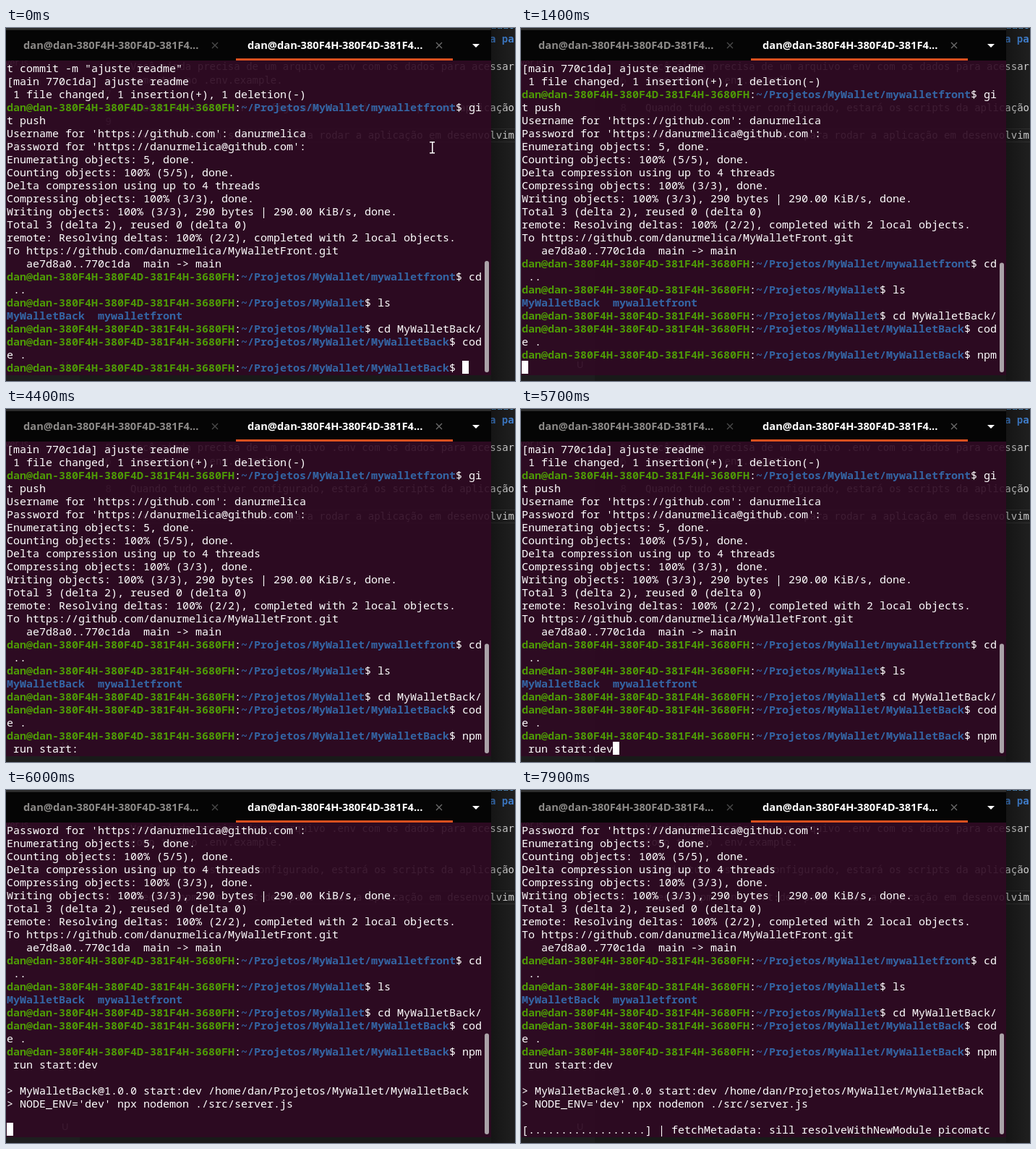
An HTML page with a canvas for the animation above (8000 ms loop, 704 by 488 pixels).

```html
<!DOCTYPE html>
<html lang="pt">
<head>
<meta charset="utf-8">
<title>Terminal</title>
<style>
html, body { margin: 0; overflow: hidden; background: #1e1e1e; }
canvas { display: block; }
</style>
</head>
<body>
<canvas id="stage" width="704" height="488"></canvas>
<script>
const ctx = document.getElementById('stage').getContext('2d');
const LOOP = 8000, COLS = 73, CELL = 9, ROW = 18, LAST_ROW = 460;
const USER = 'dan', HOST = 'dan-380F4H-380F4D-381F4H-3680FH', LOGIN = 'danurmelica';
const WHITE = '#fff', GREEN = '#4e9a06', BLUE = '#3465a4';

const plain = text => [[text, WHITE]];
const prompt = (path, command) => [
  [`${USER}@${HOST}`, GREEN], [':', WHITE],
  ['~/Projetos/MyWallet' + path, BLUE], ['$ ' + command, WHITE]
];

const history = [
  plain('t commit -m "ajuste readme"'),
  plain('[main 770c1da] ajuste readme'),
  plain(' 1 file changed, 1 insertion(+), 1 deletion(-)'),
  prompt('/mywalletfront', 'git push'),
  plain("Username for 'https://github.com': " + LOGIN),
  plain(`Password for 'https://${LOGIN}@github.com':`),
  ...['Enumerating objects: 5, done.',
    'Counting objects: 100% (5/5), done.',
    'Delta compression using up to 4 threads',
    'Compressing objects: 100% (3/3), done.',
    'Writing objects: 100% (3/3), 290 bytes | 290.00 KiB/s, done.',
    'Total 3 (delta 2), reused 0 (delta 0)',
    'remote: Resolving deltas: 100% (2/2), completed with 2 local objects.',
    `To https://github.com/${LOGIN}/MyWalletFront.git`,
    '   ae7d8a0..770c1da  main -> main'].map(plain),
  prompt('/mywalletfront', 'cd ..'),
  prompt('', 'ls'),
  [['MyWalletBack  mywalletfront', BLUE]],
  prompt('', 'cd MyWalletBack/'),
  prompt('/MyWalletBack', 'code .')
];

// '<' is a backspace
const keys = [
  [500, 'n'], [700, 'p'], [1400, 'm'], [1500, ' '], [1700, 'r'], [1900, 'u'], [2000, 'n'],
  [2200, ' s'], [2400, 't'], [2500, 'a'], [2600, 'r'], [2800, 't'], [3600, ':'],
  [3800, 'e'], [4400, '<'], [4600, 'd'], [4700, 'e'], [4900, 'v']
];
const cursorOff = [[3300, 3400], [4400, 4500], [5500, 5700], [6300, LOOP]];
const resolve = name => 'fetchMetadata: sill resolveWithNewModule ' + name;
const progress = [
  [6900, '/ rollbackFailedOptional: verb npm-session 671f344b'],
  [7200, ''],
  [7300, '- ' + resolve('chokidar')],
  [7500, ''],
  [7600, '\\ ' + resolve('undefsaf')],
  [7800, '| ' + resolve('readdirp')],
  [7900, '| ' + resolve('picomatc')]
];

function typedAt(t) {
  return keys.filter(([at]) => at <= t)
    .reduce((text, [, key]) => key === '<' ? text.slice(0, -1) : text + key, '');
}

function linesAt(t) {
  const lines = [...history, prompt('/MyWalletBack', typedAt(t))];
  if (t >= 6000) {
    lines.push(plain(''),
      plain(`> MyWalletBack@1.0.0 start:dev /home/${USER}/Projetos/MyWallet/MyWalletBack`),
      plain("> NODE_ENV='dev' npx nodemon ./src/server.js"), plain(''));
  }
  if (t >= 5900) {
    const step = progress.filter(([at]) => at <= t).pop();
    lines.push(plain(step && step[1] ? `[${'.'.repeat(18)}] ${step[1]}` : ''));
  }
  return lines;
}

// Breaks coloured lines into screen rows of [column, text, colour]
function wrap(lines) {
  const rows = [];
  let col = 0;
  for (const line of lines) {
    rows.push([]);
    col = 0;
    for (let [text, color] of line) {
      while (text) {
        if (col === COLS) { rows.push([]); col = 0; }
        const part = text.slice(0, COLS - col);
        rows[rows.length - 1].push([col, part, color]);
        col += part.length;
        text = text.slice(part.length);
      }
    }
  }
  if (col === COLS) { rows.push([]); col = 0; }
  return { rows, col };
}

function rect(x, y, w, h, color) {
  ctx.fillStyle = color;
  ctx.fillRect(x, y, w, h);
}

function write(text, x, y, color, font) {
  ctx.font = font;
  ctx.fillStyle = color;
  ctx.fillText(text, x, y);
}

function cross(x, y, color) {
  ctx.strokeStyle = color;
  ctx.lineWidth = 1.4;
  ctx.beginPath();
  ctx.moveTo(x - 4, y - 4); ctx.lineTo(x + 4, y + 4);
  ctx.moveTo(x + 4, y - 4); ctx.lineTo(x - 4, y + 4);
  ctx.stroke();
}

function drawEditor() {
  const mono = '14px "DejaVu Sans Mono", monospace';
  const sans = '13px "Open Sans", sans-serif';
  rect(0, 0, 704, 488, '#1e1e1e');
  rect(0, 0, 102, 488, '#252526');
  rect(172, 139, 532, 1, '#303030');
  rect(172, 157, 532, 1, '#303030');
  write('dado', 670, 1, '#569cd6', 'bold ' + mono);
  write('a pa', 669, 20, '#4080d0', 'bold ' + mono);
  const text = [
    'Você ainda precisa de um arquivo .env com os dados para acessar',
    'como tem no .env.example.', '',
    'Quando tudo estiver configurado, estará os scripts da aplicação', '',
    'execute npm run start:dev para rodar a aplicação em desenvolvim'
  ];
  text.forEach((line, i) => {
    const y = 58 + 19 * i;
    write(line, 172, y, '#d4d4d4', mono);
    write(String(i + 5).padStart(2), 129, y, '#858585', mono);
  });
  write('server.js', -20, 52, '#ccc', sans);
  write('status', -17, 164, '#ccc', sans);
  write('U', 77, 470, '#ccc', sans);
  const shade = ctx.createLinearGradient(671, 0, 700, 0);
  shade.addColorStop(0, 'rgba(0,0,0,.3)');
  shade.addColorStop(1, 'rgba(0,0,0,0)');
  rect(671, 0, 33, 488, shade);
  rect(0, 480, 671, 8, 'rgba(0,0,0,.18)');
}

function drawTabs() {
  const title = `${USER}@${HOST}`.slice(0, 27) + '...';
  const font = 'bold 14.7px "Open Sans", sans-serif';
  rect(0, 0, 671, 3, '#2b2b2b');
  rect(0, 3, 671, 42, '#050505');
  rect(318, 42, 300, 3, '#d9501f');
  write(title, 24, 29, '#8c8a88', font);
  write(title, 334, 29, WHITE, font);
  cross(289, 24, '#4a4a4a');
  cross(599, 24, '#6a6a6a');
  ctx.fillStyle = WHITE;
  ctx.beginPath();
  ctx.moveTo(645, 22); ctx.lineTo(655, 22); ctx.lineTo(650, 27);
  ctx.fill();
}

function drawTerminal(t) {
  const { rows, col } = wrap(linesAt(t));
  const scrolled = rows.length - 24;
  rect(0, 45, 671, 435, 'rgba(46,8,34,.9)');
  rows.slice(-24).forEach((row, i) => {
    const y = LAST_ROW - ROW * (23 - i) + 15;
    for (const [c, text, color] of row) {
      const weight = color === WHITE ? '' : 'bold ';
      write(text, 1 + c * CELL, y, color, weight + '15px "Noto Sans Mono", monospace');
    }
  });
  if (!cursorOff.some(([from, to]) => t >= from && t < to)) {
    rect(1 + col * CELL, LAST_ROW, CELL, ROW, WHITE);
  }
  const top = 322 + 2.4 * scrolled;
  ctx.fillStyle = '#aaa3a8';
  ctx.beginPath();
  ctx.roundRect(662, top, 6, 476 - top, 3);
  ctx.fill();
}

function drawPointer() {
  rect(586, 157, 7, 1.5, WHITE);
  rect(589, 157, 1.5, 16, WHITE);
  rect(586, 172, 7, 1.5, WHITE);
}

function frame(now) {
  const t = now % LOOP;
  drawEditor();
  drawTerminal(t);
  drawTabs();
  if (t < 400) drawPointer();
  requestAnimationFrame(frame);
}
requestAnimationFrame(frame);
</script>
</body>
</html>
```
